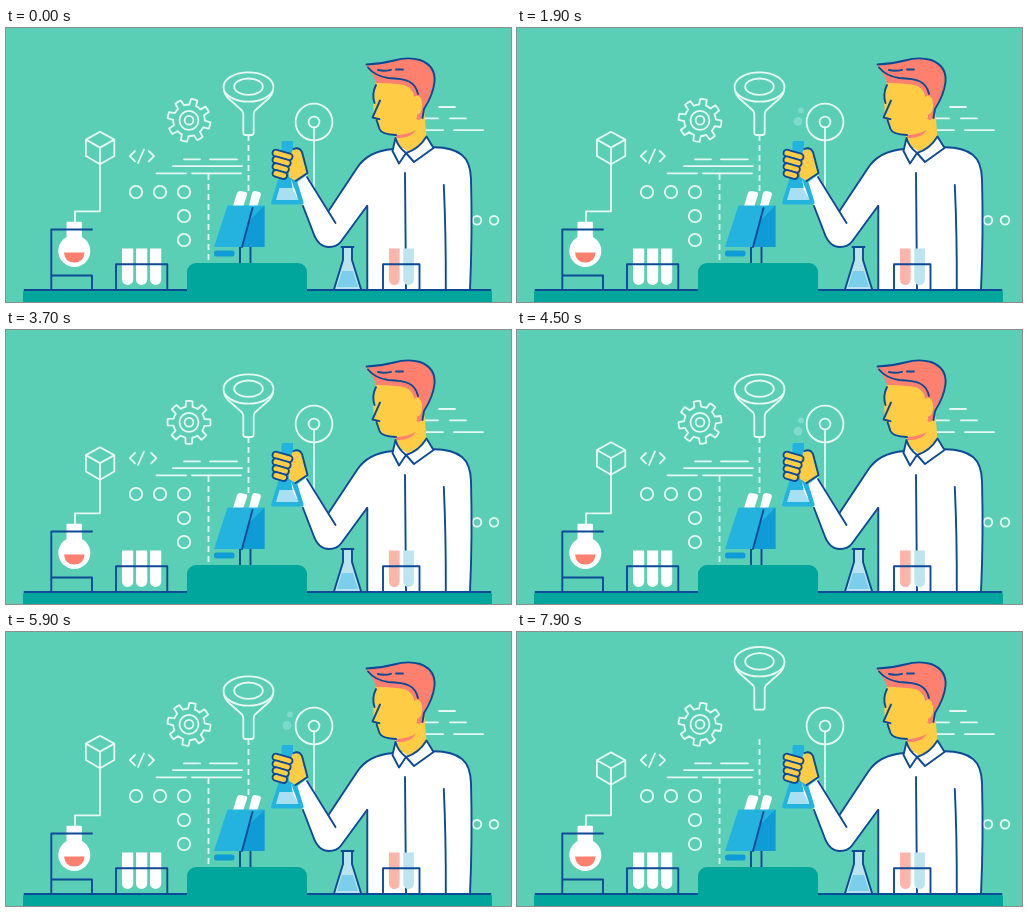
Recreate the animation shown at these times as an HTML page with a canvas. Size 505 px wide and 274 px high, loop 8000 ms.

```html
<!DOCTYPE html>
<html lang="en">
<head>
<meta charset="utf-8">
<title>Laboratory</title>
<style>
html, body { margin: 0; width: 100%; height: 100%; overflow: hidden; background: #5bcfb5; }
canvas { display: block; width: 505px; height: 274px; }
</style>
</head>
<body>
<canvas id="stage"></canvas>
<script>
const W = 505, H = 274, LOOP = 8000;
const NAVY = '#0d4a96', PALE = '#e6f8f3', WHITE = '#fff', TEAL = '#00a59c';
const BLUE = '#24b3df', DEEP = '#0f9bd6', ICE = '#a9dff2', SKIN = '#ffcd45', CORAL = '#ff806f';
const cv = document.getElementById('stage');
const c = cv.getContext('2d');
const dpr = window.devicePixelRatio || 1;
cv.width = W * dpr;
cv.height = H * dpr;

function shape(d, fill, line, width = 1.9) {
  const p = new Path2D(d);
  if (fill) { c.fillStyle = fill; c.fill(p); }
  if (line) { c.strokeStyle = line; c.lineWidth = width; c.stroke(p); }
}
const pale = d => shape(d, null, PALE, 1.8);
const navy = d => shape(d, null, NAVY);

function oval(x, y, rx, ry, fill, line) {
  c.beginPath();
  c.ellipse(x, y, rx, ry, 0, 0, Math.PI * 2);
  if (fill) { c.fillStyle = fill; c.fill(); }
  if (line) { c.strokeStyle = line; c.lineWidth = 1.8; c.stroke(); }
}
const ring = (x, y, r) => oval(x, y, r, r, null, PALE);

function box(x, y, w, h, r, fill, line) {
  c.beginPath();
  c.roundRect(x, y, w, h, r);
  if (fill) { c.fillStyle = fill; c.fill(); }
  if (line) { c.strokeStyle = line; c.lineWidth = 1.9; c.stroke(); }
}

function shifted(x, y, draw) {
  c.save();
  c.translate(x, y);
  draw();
  c.restore();
}

function dashes(x, top, bottom) {
  c.save();
  c.lineCap = 'butt';
  c.setLineDash([6, 4]);
  pale(`M${x} ${top}V${bottom}`);
  c.restore();
}

// Smooth 0..1 between two times
function ease(t, from, to) {
  const k = Math.min(1, Math.max(0, (t - from) / (to - from)));
  return (1 - Math.cos(Math.PI * k)) / 2;
}
const sway = (t, from, mid, to) => ease(t, from, mid) - ease(t, mid, to);

function gear(angle) {
  c.save();
  c.translate(183, 92.3);
  c.rotate(angle);
  c.beginPath();
  const teeth = 8, step = Math.PI * 2 / teeth;
  for (let i = 0; i < teeth; i++) {
    const a = i * step - Math.PI / 2;
    c.arc(0, 0, 21.5, a - 0.15, a + 0.15);
    c.arc(0, 0, 15.8, a + 0.22, a + step - 0.22);
  }
  c.closePath();
  c.strokeStyle = PALE;
  c.lineWidth = 1.8;
  c.stroke();
  c.restore();
  ring(183, 92.3, 9.5);
  ring(183, 92.3, 4.4);
}

function cube() {
  pale('M94 103.8L108.3 111.6V128L94 136.2L79.9 128V111.6ZM79.9 111.6L94 119.6L108.3 111.6M94 119.6V136');
}

function funnel() {
  oval(242.5, 59, 25, 14.7, null, PALE);
  oval(242.5, 58.7, 14.3, 8.2, null, PALE);
  pale('M218 63Q219 67 222 70L236 82.5Q237.3 84 237.3 86.5V104.5Q237.3 107 239.5 107H245.5Q247.7 107 247.7 104.5V86.5Q247.7 84 249 82.5L263 70Q266 67 267 63');
}

function icons(t) {
  gear((14 + t * 0.045) * Math.PI / 180);
  pale('M94 136V183.3H69V194');
  shifted(0, 17 * (sway(t, 3000, 4000, 5000) + ease(t, 7000, 8000)), cube);
  dashes(242.5, 107, 164);
  shifted(0, -30 * ease(t, 7000, 8000), funnel);
  dashes(202.5, 146, 235);

  pale('M129 123L123.8 128.2L129 133.4M138 121.5L132 135');
  const beat = t % 2000;
  shifted(13 * sway(beat, 500, 1200, 1900), 0, () => pale('M142.8 123L148 128.2L142.8 133.4'));

  pale('M178 131.3H194M204 131.3H231M167 138.2H236M150.5 145.3H180M186 145.3H235');
  for (const x of [130, 154, 178]) ring(x, 164, 6.2);
  for (const y of [188, 212]) ring(178, y, 6.2);
  ring(308, 94, 18.4);
  ring(308, 94, 5.4);
  pale('M308 99.5V160');
  pale('M433 79H449M415 90.4H432M444 90.4H460M415 102.2H437M448 102.2H477');
  ring(471, 192.3, 4.3);
  ring(488, 192.3, 4.3);
}

function bubbles(t) {
  const k = t % 4000;
  const a = ease(k, 0, 1000) * (1 - ease(k, 1000, 2700));
  if (a <= 0) return;
  const y = -16 * ease(k, 0, 1000);
  c.globalAlpha = a;
  oval(281, 109.3 + y, 4.4, 4.4, '#a9e6e6');
  oval(284, 98.5 + y, 2.9, 2.9, '#a9e6e6');
  c.globalAlpha = 1;
}

function tube(x, w, fill) {
  box(x, 220.5, w, 36.5, [0, 0, w / 2, w / 2], fill);
}

function bench() {
  box(17, 262, 469, 14, [3, 3, 0, 0], TEAL);

  // Round flask on its stand
  box(60.5, 193.8, 15.4, 18, 1, WHITE);
  oval(68.3, 223, 16, 16, WHITE);
  shape('M58 224.5H78.6Q77.6 234.5 68.3 234.5Q59 234.5 58 224.5Z', CORAL);
  navy('M86 201.5H45.3V262M45.3 247.5H86V262');

  for (const x of [116, 130, 144]) tube(x, 11.2, WHITE);
  navy('M110 262V236.3H161.3V262');
}

function microscope() {
  shape('M227 178L231 165Q232 163 234 163L240 164Q242 165 241 167L237 179Z', WHITE);
  shape('M243 178L246 165Q247 163 249 163L253.5 164Q255.5 165 254.8 167L251 179Z', WHITE);
  navy('M234 219V235M244.5 205V235');
  shape('M221.5 177.5H258.5V219H208Z', BLUE);
  shape('M243 193L258.5 177.5V219H236Z', DEEP);
  navy('M246.5 180L236 219');
  box(208, 222.5, 20.5, 6, 2.5, DEEP);
  box(181, 235, 120, 39, [9, 9, 0, 0], TEAL);
}

function coat() {
  shape('M289 156L301 147L323 183L351 140Q362 123 387 120.5L425 118.5Q446 119 456 127Q464.5 134 465 151Q467 205 464 262H361V178L335 213.5Q331 219 323 219Q312 219 307 204L297 178Z', WHITE);
  navy('M301 149L329.5 195M297 178L307 204Q312 219 323 219Q331 219 335 213.5L361 178');
  navy('M322.5 183L351 140Q362 123 387 121M361.3 178L361.3 262');
  navy('M427 119.3Q446 119 456 127Q464.5 134 465 151Q466.5 205 464 262');
  navy('M399 145L400 262M437.8 157Q440 205 439.8 262');
}

function head() {
  // Neck and face
  shape('M389 100L418 80L421 115L405 126L389 114Z', SKIN);
  shape('M370 54L367 66L367.5 84L366.5 90L370 92L374 102Q376 107 390 107Q408 105 416 91L414 51L385 47Z', SKIN);
  shape('M390 107Q400 107 410 102Q404 111 390 110Z', CORAL);
  // Hair
  shape('M360.5 36.5Q375 36 388 32.5Q402 28.5 414 32Q430 38 428.5 54Q427 67 418 82L416.5 90L413 92Q409 91 407 85L408 68Q406 58 395 56.5Q382 54.5 370 55Q368 47 361.5 40Z', CORAL);
  oval(411, 77, 5.2, 9.5, SKIN);
  shape('M406 69H411V90L405 91Z', SKIN);
  navy('M360.5 36.5Q375 36 388 32.5Q402 28.5 414 32Q430 38 428.5 54Q427 67 418 81L416.5 90');
  navy('M362 39.5Q369 48 382 50Q397 50.5 403 53.5Q410 57 412 66M372 42Q378 43.5 385 41.8M390 41.5H397');
  navy('M370 57Q365.5 66 368.5 75M374 72.5L366.5 89.5L373.5 91.2M370.5 92L373.5 101Q375.5 106.5 390 107');
  // Collar
  shape('M389.5 110L386.5 123L393 135.5L400 125Q392 119 389.5 110Z', WHITE, NAVY);
  shape('M420.5 108.5L427.5 120L408 134L400 125Q413 121 420.5 108.5Z', WHITE, NAVY);
}

function hand() {
  shape('M277 113H287V140L297.5 174Q298 176.5 295 176.5H267.5Q264.5 176.5 265.2 174L275.5 141V115Q275.5 113 277 113Z', BLUE);
  shape('M273.5 160H288.5L292.5 172H270Z', ICE);
  shape('M285 151L291.5 170L287 162Z', WHITE);
  shape('M287 121Q293 118.5 296 124L301.5 145L289.5 153L283 149L282 134Z', SKIN);
  navy('M287.5 121Q293 118.5 296 124L301.5 145L289.5 153');
  // Four curled fingers
  for (let i = 0; i < 4; i++) {
    c.save();
    c.translate(276.5 - i * 0.9, 127 + i * 6.5);
    c.rotate(0.28);
    const w = 20.5 - i * 1.9;
    box(-w / 2, -3.4, w, 6.8, 3.4, SKIN, NAVY);
    c.restore();
  }
}

function foreground() {
  shape('M337 219H346V232L355.5 262H327.5L337 232Z', '#b9e4ee');
  shape('M336 243H347L352 259H331Z', '#7ccfea');
  navy('M335.5 219H347.5M337 219V232L327.8 262H355.3L346 232V219');
  tube(383, 10.6, '#fbb5a9');
  tube(397.3, 10.6, '#bde5ef');
  navy('M377 262V236.3H413.5V262');
  navy('M18.5 262H484.5');
}

function draw(t) {
  c.setTransform(dpr, 0, 0, dpr, 0, 0);
  c.lineCap = c.lineJoin = 'round';
  c.fillStyle = '#5bcfb5';
  c.fillRect(0, 0, W, H);
  icons(t);
  bubbles(t);
  bench();
  coat();
  head();
  hand();
  foreground();
  microscope();
}

const start = performance.now();
function tick(now) {
  draw(Math.max(0, now - start) % LOOP);
  requestAnimationFrame(tick);
}
draw(0);
requestAnimationFrame(tick);
</script>
</body>
</html>
```
